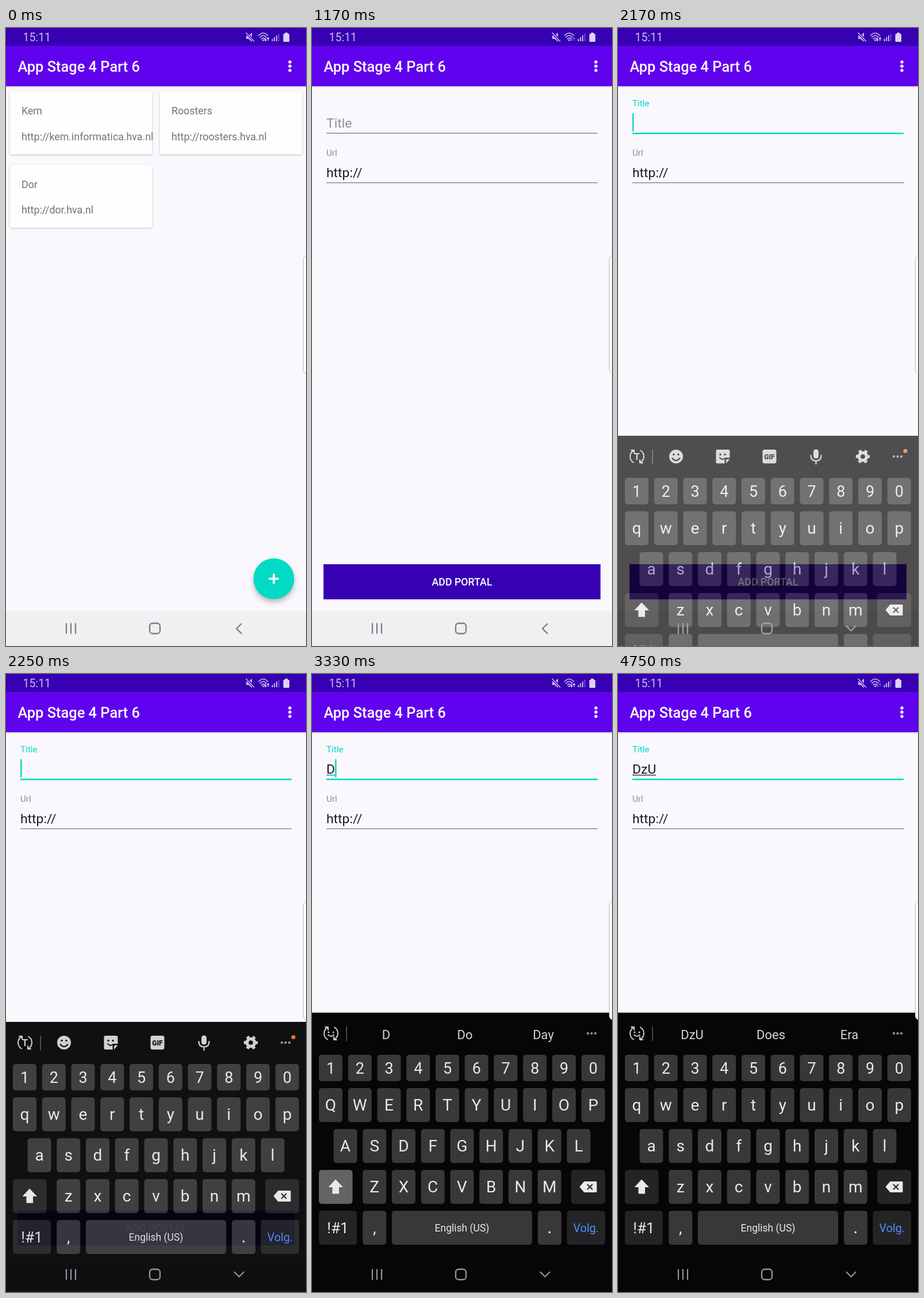
An HTML page for the animation above (5.08 s loop, 522x1073 px).

```html
<!DOCTYPE html>
<html lang="en">
<head>
<meta charset="utf-8">
<title>Portal form</title>
<style>
html, body { margin: 0; width: 100%; height: 100%; overflow: hidden; background: #faf8fc; }
svg { display: block; width: 100vw; height: 100vh; font-family: Roboto, "Noto Sans", sans-serif; }
text { white-space: pre; }
.mid { text-anchor: middle; }
.line { fill: none; stroke-linecap: round; stroke-linejoin: round; }
.card rect { fill: #fffeff; filter: drop-shadow(0 1.5px 1.5px rgba(0,0,0,.24)); }
.card text { font-size: 17.8px; fill: #747276; }
#fab { filter: drop-shadow(0 5px 5px rgba(0,0,0,.27)); }
</style>
</head>
<body>
<svg id="stage" viewBox="0 0 522 1073" preserveAspectRatio="none"></svg>
<script>
const LOOP = 5080;
const INK = '#e9e9ea', KEY = '#38383b', DARK = '#242427', LIT = '#636366', TEAL = '#03dac5';

const rect = (x, y, w, h, fill, r = 0, more = '') =>
  `<rect x="${x}" y="${y}" width="${w}" height="${h}" rx="${r}" fill="${fill}" ${more}/>`;
const circle = (x, y, r, fill, more = '') =>
  `<circle cx="${x}" cy="${y}" r="${r}" fill="${fill}" ${more}/>`;
const text = (x, y, size, fill, str, more = '') =>
  `<text x="${x}" y="${y}" font-size="${size}" fill="${fill}" ${more}>${str}</text>`;
const mid = (x, y, size, fill, str, more = '') => text(x, y, size, fill, str, `class="mid" ${more}`);
const path = (d, stroke, width, more = '') =>
  `<path class="line" d="${d}" stroke="${stroke}" stroke-width="${width}" ${more}/>`;
const group = (id, body, more = '') => `<g id="${id}" ${more}>${body}</g>`;

function statusBar() {
  const c = '#c5b6e9';
  const bars = [0, 1, 2, 3].map(i =>
    rect(462.5 + i * 3.7, 19 - i * 3, 2, 4 + i * 3, c, 0, i > 2 ? 'opacity=".4"' : '')).join('');
  return rect(0, 0, 522, 31, '#3700b3') +
    text(29.5, 23, 19.5, '#c9bce9', '15:11') +
    `<path d="M418 13h4l6-5v16l-6-5h-4z" fill="${c}"/>` +
    path('M418 8.5L432 23', '#3700b3', 4) + path('M418 8.5L431.5 23', c, 1.6) +
    path('M439.5 13Q447.5 4.500 455.500 13M442 16Q447.500 10 453 16M444.500 19Q447.500 16 450.500 19', c, 1.7) +
    circle(447.5, 21.2, 1.5, c) +
    group('arrows', path('M451.500 17v5M450 20.500l1.500 1.800 1.500-1.800M456 22v-5M454.500 18.500l1.500-1.800 1.500 1.800', '#e2d9f5', 1.2)) +
    bars + rect(482.5, 10, 10.5, 14, '#dcd2f2', 1.5) + rect(485.2, 8, 5, 3, '#dcd2f2', 1);
}

function appBar() {
  return rect(0, 31, 522, 70, '#6002ee', 0, 'style="filter:drop-shadow(0 1px 1.5px rgba(0,0,0,.25))"') +
    text(20.5, 76, 25.4, '#fff', 'App Stage 4 Part 6', 'font-weight="500"') +
    [59, 66.3, 73.6].map(y => circle(494, y, 2.7, '#fff')).join('');
}

const card = (x, y, name, url) => `<g class="card">${rect(x, y, 248, 109.5, '#fff', 4.5)}` +
  `<text x="${x + 20.5}" y="${y + 40.3}">${name}</text><text x="${x + 20.5}" y="${y + 85}">${url}</text></g>`;

function form() {
  return text(25, 173, 22.9, '#918e94', 'Title', 'id="label"') +
    rect(25, 182, 472, 1.3, '#7f7c83', 0, 'id="line"') +
    text(25, 173, 22.9, '#1c1a1e', '', 'id="typed"') +
    rect(25, 174.8, 0, 1.5, '#333', 0, 'id="under"') +
    rect(25, 148, 2.5, 31.5, TEAL, 0, 'id="cursor"') +
    text(25, 222.3, 15.2, '#918e94', 'Url') +
    text(25, 259, 22.9, '#1c1a1e', 'http://') +
    rect(25, 268, 472, 1.3, '#7f7c83') +
    rect(20, 931, 482, 61, '#3700b3') +
    mid(261, 968.2, 17.8, '#fff', 'ADD PORTAL', 'font-weight="500"');
}

function fab() {
  return circle(0, 0, 35.5, TEAL) + circle(0, 0, 35.5, '#3bcabb', 'id="tint"') +
    rect(-8.7, -1.8, 17.4, 3.6, '#fff') + rect(-1.8, -8.7, 3.6, 17.4, '#fff');
}

function navIcons() {
  return path('M105 1034v17M113 1034v17M121 1034v17', 'currentColor', 2.2) +
    `<rect x="250" y="1033.500" width="18" height="18" rx="5" fill="none" stroke="currentColor" stroke-width="2.300"/>` +
    path('M409.500 1034.500l-8.500 8.300 8.500 8.300', 'currentColor', 2.2, 'id="back"') +
    path('M397.500 1038.500l8 8 8-8', 'currentColor', 2.2, 'id="down"');
}

const key = (id, x, y, w, h, label, size = 28, fill = KEY) =>
  rect(x, y, w, h, fill, 5, `id="k-${id}" data-fill="${fill}"`) +
  mid(x + w / 2, y + h / 2 + 9.5, size, INK, label, `data-letter="${id}"`);

const row = (chars, x, y, h, size) =>
  [...chars].map((c, i) => key(c, x + i * 50.75, y, 41, h, c, size)).join('');

function toolbar() {
  const c = '#cfcfd1', b = '#060508';
  const face = x => circle(x - 4, 620.5, 1.7, b) + circle(x + 4, 620.5, 1.7, b);
  return path('M27 634.500A12 12 0 0 1 27.500 613.500M39 613.500A12 12 0 0 1 38.500 634.500', c, 2) +
    path('M23 613h5v5M43 635h-5v-5', c, 2) +
    rect(59.5, 612, 1.3, 25, '#6b6b6e') +
    [480, 486.5, 493].map(x => circle(x, 624, 2.2, '#8e8e91')).join('') +
    group('tools',
      mid(33, 630, 16, c, 'T', 'font-weight="700"') +
      circle(101, 624, 12, c) + face(101) + path('M94.500 627Q101 635 107.500 627', b, 2) +
      `<path d="M173 612h19q2.500 0 2.500 2.500V626h-6q-3 0-3 3v7H173q-2.500 0-2.500-2.500v-19q0-2.500 2.500-2.500zM188 636v-5q0-2.500 2.500-2.500h4z" fill="${c}"/>` +
      face(182) + path('M177 626Q181 631 186 627', b, 1.8) +
      rect(251.5, 612, 24, 24, c, 3.5) + mid(263.5, 628.5, 12, b, 'GIF', 'font-weight="900"') +
      rect(340, 611.5, 9, 16, c, 4.5) + path('M335.500 622Q335.500 631.500 344.500 631.500T353.500 622M344.500 632v5', c, 2.2) +
      circle(426, 624, 6.6, 'none', `stroke="${c}" stroke-width="5.500"`) +
      circle(426, 624, 10.2, 'none', `stroke="${c}" stroke-width="4" stroke-dasharray="5.340" stroke-dashoffset="2.670"`) +
      circle(500, 614.5, 3.6, '#e8732c')) +
    group('words',
      circle(28.8, 622, 1.5, c) + circle(37.2, 622, 1.5, c) + path('M28 626.500Q33 631.500 38 626.500', c, 1.8) +
      [129, 266, 402.5].map(x => mid(x, 633.5, 22, '#d5d5d7', '')).join(''));
}

function keyboard() {
  return rect(0, 588, 522, 485, '#060508') + toolbar() +
    row('1234567890', 12, 661, 46, 27) + row('qwertyuiop', 12, 719, 59) +
    row('asdfghjkl', 37.5, 790, 59) + row('zxcvbnm', 88.2, 861, 59) +
    key('shift', 12, 861, 58.5, 59, '', 28, DARK) + key('del', 451, 861, 59, 59, '', 28, DARK) +
    `<path d="M41 877.500L54 891H47V902.500H35.500V891H28.500z" fill="${INK}"/>` +
    `<path d="M465.500 890.500l8-9.500H494q1.500 0 1.500 1.500v16q0 1.500-1.500 1.500H473.500z" fill="${INK}"/>` +
    path('M479.500 886.500l8 8M487.500 886.500l-8 8', DARK, 2) +
    key('sym', 12, 932, 66, 59, '!#1', 26, DARK) + key(',', 88.2, 932, 41, 59, ',') +
    rect(139, 932, 244, 59, KEY, 5) + mid(261, 967.5, 17.5, INK, 'English (US)') +
    key('.', 393, 932, 41, 59, '.', 32) +
    rect(443.5, 932, 66.5, 59, DARK, 5) + mid(476.8, 968.5, 19.8, '#4a91f7', 'Volg.');
}

const stage = document.getElementById('stage');
stage.innerHTML =
  rect(0, 0, 522, 1073, '#faf8fc') +
  group('cards',
    card(6.5, 110, 'Kem', 'http://kem.informatica.hva.nl') +
    card(267.5, 110, 'Roosters', 'http://roosters.hva.nl') +
    card(6.5, 237.3, 'Dor', 'http://dor.hva.nl')) +
  group('form', form()) + group('fab', fab()) +
  appBar() + statusBar() +
  rect(0, 1012, 522, 61, '#f2eff3') +
  group('board', rect(0, 1073, 522, 160, '#060508') + keyboard()) +
  group('nav', navIcons()) +
  rect(517.3, 394.5, 20, 206, '#fff', 7, 'stroke="#b9b7bb" stroke-width="1"');

const el = id => document.getElementById(id);
const set = (id, attrs) => { for (const k in attrs) el(id).setAttribute(k, attrs[k]); };
const letters = [...stage.querySelectorAll('[data-letter]')].filter(n => /^[a-z]$/.test(n.dataset.letter));
const words = [...el('words').querySelectorAll('text')];

const start = { cards: 1, form: 0, fab: 1, tint: 0, arrows: 1, focus: 0, cursor: 0, nav: '#7d7b80', down: 0,
  drop: 0, alpha: 0, shift: 0, caps: 0, press: '', typed: '', words: null, blue: 0, under: '#1c8fa8' };

// Each step changes only the listed parts, from its time on.
const steps = [
  [580, { tint: .3 }],
  [660, { tint: .65 }],
  [750, { tint: 1, arrows: .4 }],
  [920, { cards: 0, fab: .76 }],
  [1000, { fab: .4, form: 1 }],
  [1090, { fab: .1 }],
  [1170, { fab: 0 }],
  [1580, { arrows: 1 }],
  [1920, { focus: .3, cursor: 1 }],
  [2000, { focus: .8 }],
  [2080, { focus: 1, down: 1, nav: '#b8b6b9' }],
  [2170, { drop: 120, alpha: .7, nav: '#a5a4a6' }],
  [2250, { drop: 16, alpha: .955, nav: '#97969a' }],
  [2330, { drop: 3, alpha: 1 }],
  [2420, { drop: 0, cursor: 0 }],
  [2920, { cursor: 1 }],
  [3000, { press: 'shift' }],
  [3080, { press: '', shift: 1, caps: 1 }],
  [3250, { press: 'd' }],
  [3330, { press: '', typed: 'D', words: ['D', 'Do', 'Day'] }],
  [3500, { shift: 0, caps: 0 }],
  [3580, { press: 'z' }],
  [3670, { press: '', typed: 'Dz', words: ['Dz', 'De', 'DzU'], blue: 1 }],
  [3750, { press: 'shift' }],
  [3830, { press: '', shift: 1, caps: 1 }],
  [4000, { shift: 0 }],
  [4080, { press: 'u' }],
  [4170, { cursor: 0 }],
  [4250, { press: '', typed: 'DzU', caps: 0, cursor: 1 }],
  [4330, { words: ['DzU', 'Does', 'Era'], blue: 0 }],
  [4420, { arrows: .4 }],
  [4580, { under: '#39373b' }],
  [4750, { cursor: 0 }]
];

const mix = (a, b, p) => a + (b - a) * p;

function draw(s) {
  set('cards', { opacity: s.cards });
  set('form', { opacity: s.form });
  set('fab', { transform: `translate(466 956.300) scale(${s.fab})`, opacity: s.fab ? 1 : 0 });
  set('tint', { opacity: s.tint });
  set('arrows', { opacity: s.arrows });
  set('label', { y: mix(173, 136.3, s.focus), 'font-size': mix(22.9, 15.2, s.focus), fill: s.focus ? TEAL : '#918e94' });
  set('line', s.focus ? { y: 181.7, height: 2.6, fill: TEAL } : { y: 182, height: 1.3, fill: '#7f7c83' });

  el('typed').textContent = s.typed;
  const width = s.typed ? el('typed').getComputedTextLength() : 0;
  set('under', { width, fill: s.under });
  set('cursor', { x: 25 + width, opacity: s.cursor });

  set('board', { transform: `translate(0 ${s.drop})`, opacity: s.alpha });
  set('nav', { color: s.nav });
  set('back', { opacity: 1 - s.down });
  set('down', { opacity: s.down });
  set('tools', { opacity: s.words ? 0 : 1 });
  set('words', { opacity: s.words ? 1 : 0 });
  words.forEach((n, i) => {
    n.textContent = s.words ? s.words[i] : '';
    n.setAttribute('fill', s.blue && i === 1 ? '#2f8ff0' : '#d5d5d7');
  });
  for (const n of letters) {
    const c = n.dataset.letter;
    n.textContent = s.caps ? c.toUpperCase() : c;
    set('k-' + c, { fill: s.press === c ? LIT : KEY });
  }
  set('k-shift', { fill: s.shift ? LIT : s.press === 'shift' ? '#4a4a4d' : DARK });
}

let shown = -1;
function tick() {
  const t = performance.now() % LOOP;
  const past = steps.filter(([at]) => at <= t);
  if (past.length !== shown) {
    shown = past.length;
    draw(Object.assign({}, start, ...past.map(([, change]) => change)));
  }
  requestAnimationFrame(tick);
}
tick();
</script>
</body>
</html>
```
